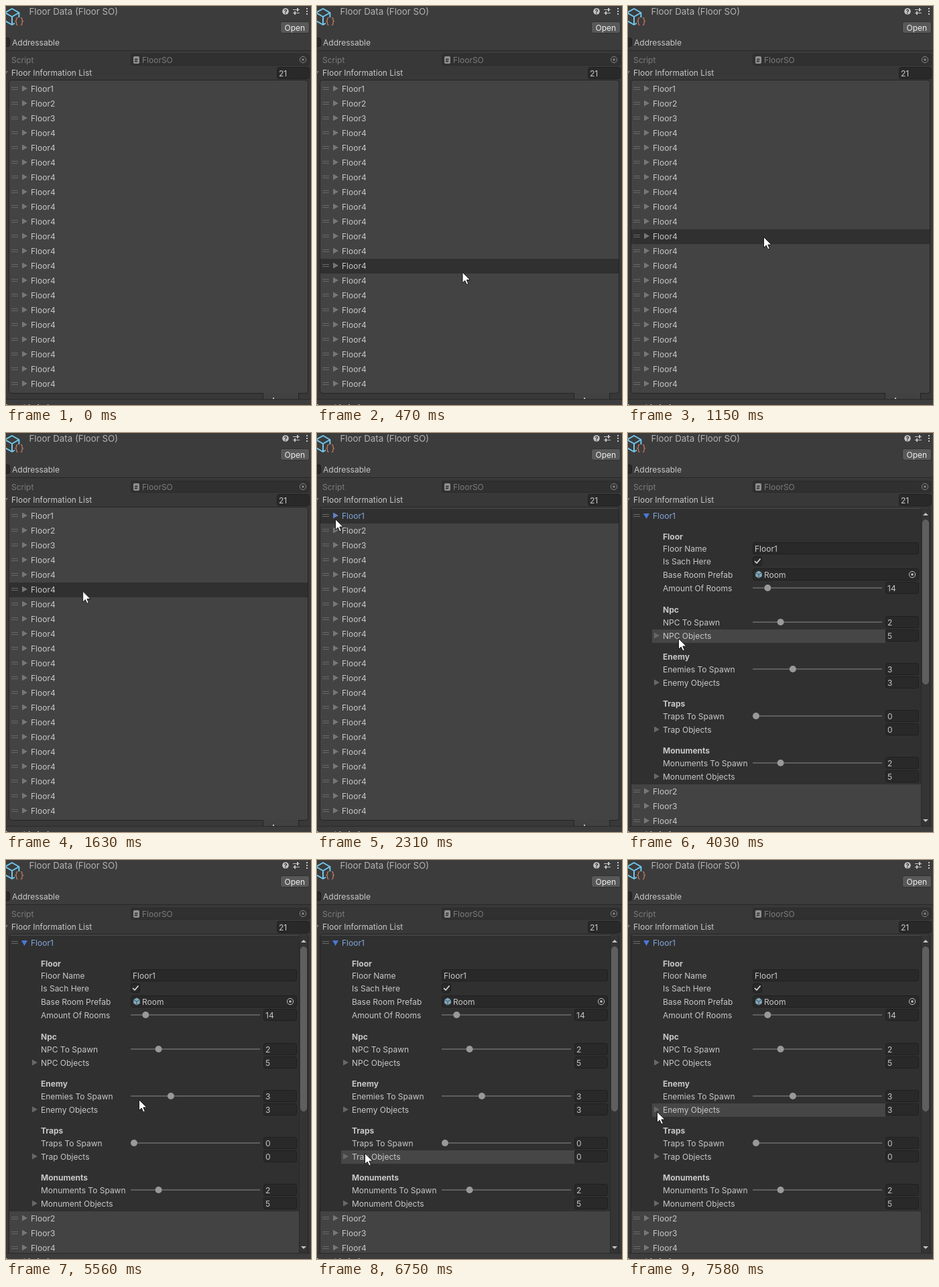
These frames come from a looping animation (455 by 595 pixels, 8 s). An HTML page with a canvas:

```html
<!DOCTYPE html>
<html lang="en">
<head>
<meta charset="utf-8">
<title>Inspector list</title>
<style>
  html, body { margin: 0; width: 100%; height: 100%; overflow: hidden; background: #383838; }
  canvas { display: block; }
</style>
</head>
<body>
<canvas id="stage" width="455" height="595"></canvas>
<script>
const ctx = document.getElementById('stage').getContext('2d');
const LOOP = 8000, ENTER = 190, PRESS = 2240, EXPAND = 2380;
const TOP = 113, ROW = 22, ROWS = 21;
const TEXT = '#c8c8c8', DIM = '#7c7c7c', ICON = '#c4c4c4', ARROW = '#777777', GRIP = '#686868';
const PANEL = '#3c3c3c', LIST = '#434343', HOVER = '#303030', FIELD = '#292929', EDGE = '#242424';
const FOCUS = '#82a6da';

// Each pointer move eases from the previous place to (x, y).
const moves = [
  { from: 120, to: 620, x: 202, y: 344 },
  { from: 1280, to: 1980, x: 27, y: 128 },
  { from: 2570, to: 3270, x: 75, y: 316 },
  { from: 3410, to: 3760, x: 140, y: 202 },
  { from: 3760, to: 4030, x: 75, y: 306 },
  { from: 4100, to: 4240, x: 61, y: 286 },
  { from: 4300, to: 4580, x: 226, y: 286 },
  { from: 4710, to: 5560, x: 198, y: 357 },
  { from: 5560, to: 6400, x: 140, y: 417 },
  { from: 6400, to: 6750, x: 71, y: 437 },
  { from: 6820, to: 7240, x: 100, y: 397 },
  { from: 7240, to: 7580, x: 43, y: 375 }
];

function pointerAt(time) {
  let x = 270, y = 590;
  for (const move of moves) {
    const u = Math.min(1, Math.max(0, (time - move.from) / (move.to - move.from)));
    const eased = u * u * (3 - 2 * u);
    x += (move.x - x) * eased;
    y += (move.y - y) * eased;
  }
  return { x, y };
}

function rect(x, y, w, h, color) {
  ctx.fillStyle = color;
  ctx.fillRect(x, y, w, h);
}

function box(x, y, w, h, fill, border, radius = 3) {
  ctx.beginPath();
  ctx.roundRect(x + .5, y + .5, w - 1, h - 1, radius);
  paint(fill, border);
}

function paint(fill, line, width = 1) {
  if (fill) {
    ctx.fillStyle = fill;
    ctx.fill();
  }
  if (line) {
    ctx.strokeStyle = line;
    ctx.lineWidth = width;
    ctx.stroke();
  }
}

function label(str, x, midY, color = TEXT, weight = 400, size = 12) {
  ctx.font = `${weight} ${size}px Inter, sans-serif`;
  ctx.fillStyle = color;
  ctx.fillText(str, x, midY + 5);
}

function circle(x, y, r, fill, line) {
  ctx.beginPath();
  ctx.arc(x, y, r, 0, Math.PI * 2);
  paint(fill, line);
}

function shape(points, fill, line, width) {
  ctx.beginPath();
  points.forEach(([x, y]) => ctx.lineTo(x, y));
  if (fill) ctx.closePath();
  paint(fill, line, width);
}

const right = (x, y, color = ARROW) => shape([[x, y - 4.5], [x + 8, y], [x, y + 4.5]], color);
const vertical = (x, y, w, h, color) => shape([[x, y], [x + w, y], [x + w / 2, y + h]], color);

function cube(x, y, r, fill, line, width) {
  const corner = i => {
    const angle = (i * 60 - 90) * Math.PI / 180;
    return [x + r * Math.cos(angle), y + r * Math.sin(angle)];
  };
  shape([0, 1, 2, 3, 4, 5].map(corner), fill, fill === PANEL && line, width);
  for (const i of [1, 3, 5]) shape([[x, y], corner(i)], null, line, width);
}

function picker(x, y, color) {
  circle(x, y, 4.6, null, color);
  circle(x, y, 1.8, color);
}

function field(x, midY, w, value) {
  box(x, midY - 9, w, 18, FIELD, '#1f1f1f');
  label(value, x + 3, midY);
}

function drawHeader() {
  rect(0, 0, 455, 66, PANEL);
  rect(0, 66, 455, 1, '#282828');

  ctx.lineJoin = 'round';
  cube(9, 16, 12, PANEL, '#70c8ee', 2);
  rect(13, 17, 15, 14, PANEL);
  label('{', 12.5, 22, '#bd7560', 500, 13.5);
  label('}', 21, 22, '#bd7560', 500, 13.5);
  label('Floor Data (Floor SO)', 34.5, 8, '#b3b3b3', 400, 13.3);

  circle(417, 8, 4.8, ICON);
  label('?', 414.5, 7, '#333', 700, 9);
  for (const side of [0, 1]) {
    rect(428, 5 + side * 5, 10, 1, ICON);
    rect(434 - side * 4, 3 + side * 5, 2, 5, ICON);
  }
  for (let i = 0; i < 3; i++) rect(448, 3 + i * 4, 2, 2, ICON);

  box(409, 23, 44, 18, '#585858', '#303030');
  label('Open', 415.5, 32, '#eeeeee');
  box(-9, 47, 15, 14, FIELD, '#1c1c1c');
  label('Addressable', 9, 54);

  label('Script', 8, 80, DIM);
  box(186, 71, 267, 18, '#303030', '#2b2b2b');
  box(190, 75, 9, 11, '#909090', '#909090', 1);
  label('#', 191.5, 79, '#303030', 700, 8);
  label('FloorSO', 203, 80, DIM);
  picker(443, 80, '#858585');

  vertical(-6, 97, 9, 6, ARROW);
  label('Floor Information List', 8, 99);
  field(404, 100, 49, '21');
}

function listRow(index, midY, color = TEXT, arrow = ARROW) {
  rect(8, midY - 2, 10, 1, GRIP);
  rect(8, midY + 1, 10, 1, GRIP);
  if (arrow) right(24, midY, arrow);
  label('Floor' + Math.min(index + 1, 4), 37, midY, color);
}

function drawCollapsed(pointer, focused) {
  box(4, 110, 447, 468, LIST, EDGE, 4);
  const hovered = pointer ? Math.floor((pointer.y - TOP) / ROW) : -1;
  if (hovered >= 0 && hovered < ROWS) rect(5, TOP + hovered * ROW, 445, ROW, HOVER);
  for (let i = 0; i < ROWS; i++) {
    const active = focused && i === 0;
    listRow(i, TOP + 10 + i * ROW, active ? FOCUS : TEXT, active ? '#667fc6' : ARROW);
  }
  rect(383, 577, 54, 10, EDGE);
  rect(384, 577, 52, 10, '#414141');
  rect(398, 584, 2, 3, ICON);
}

function sliderRow(name, y, value, min = 0, max = 10) {
  label(name, 52, y);
  rect(186, y - 1, 193, 2, '#5e5e5e');
  circle(191 + 183 * (value - min) / (max - min), y, 5, '#999999');
  field(384, y, 50, value);
}

function objectsRow(name, y, count, pointer) {
  if (Math.abs(pointer.y - y) < 10) rect(36, y - 9, 348, 20, '#464646');
  right(39, y, '#686868');
  label(name, 52, y);
  field(384, y, 50, count);
}

function drawGroup(index, title, plural, singular, spawn, count, pointer) {
  const y = 263 + index * 70;
  label(title, 52, y, TEXT, 700);
  sliderRow(plural + ' To Spawn', y + 19, spawn);
  objectsRow(singular + ' Objects', y + 39, count, pointer);
}

function drawExpanded(pointer) {
  ctx.save();
  ctx.beginPath();
  ctx.rect(0, 0, 455, 586);
  ctx.clip();
  box(4, 110, 447, 490, LIST, EDGE, 4);
  rect(5, TOP, 432, 411, HOVER);
  listRow(0, TOP + 10, FOCUS, null);
  vertical(23, 120, 9, 8, '#4a78d6');

  label('Floor', 52, 154, TEXT, 700);
  label('Floor Name', 52, 172);
  field(186, 172, 248, 'Floor1');
  label('Is Sach Here', 52, 191);
  box(186, 184, 14, 14, FIELD, '#1c1c1c');
  shape([[189, 191], [192, 194], [197.5, 187.5]], null, '#dedede', 1.6);
  label('Base Room Prefab', 52, 211);
  field(186, 211, 248, '');
  cube(195, 211, 5.5, '#83a9bb', '#38515c', 1);
  label('Room', 203, 211);
  picker(424, 211, ICON);
  sliderRow('Amount Of Rooms', 231, 14, 5, 100);

  drawGroup(0, 'Npc', 'NPC', 'NPC', 2, 5, pointer);
  drawGroup(1, 'Enemy', 'Enemies', 'Enemy', 3, 3, pointer);
  drawGroup(2, 'Traps', 'Traps', 'Trap', 0, 0, pointer);
  drawGroup(3, 'Monuments', 'Monuments', 'Monument', 2, 5, pointer);
  for (let i = 1; i < 4; i++) listRow(i, 512 + i * ROW);

  rect(437, 112, 13, 474, '#343434');
  rect(437, 112, 1, 474, '#292929');
  box(439, 129, 10, 246, '#5f5f5f', '#5f5f5f', 5);
  vertical(440, 123, 8, -4, ICON);
  vertical(440, 576, 8, 4, ICON);
  ctx.restore();
}

function drawFooter() {
  rect(0, 586, 455, 1, '#2a2a2a');
  rect(0, 587, 455, 8, PANEL);
  label('Asset Labels', -4, 598, '#d4d4d4', 700);
}

function drawPointer({ x, y }) {
  ctx.save();
  ctx.translate(x, y);
  shape([[.5, .5], [.5, 16.5], [4.2, 13], [6.8, 18.8], [9.3, 17.7], [6.8, 12], [12, 12]], '#ffffff', '#1a1a1a');
  ctx.restore();
}

function draw(now) {
  const time = now % LOOP;
  const pointer = time >= ENTER ? pointerAt(time) : null;
  rect(0, 0, 455, 595, '#383838');
  drawHeader();
  if (time < EXPAND) drawCollapsed(pointer, time >= PRESS);
  else drawExpanded(pointer);
  drawFooter();
  if (pointer) drawPointer(pointer);
  requestAnimationFrame(draw);
}
requestAnimationFrame(draw);
</script>
</body>
</html>
```
